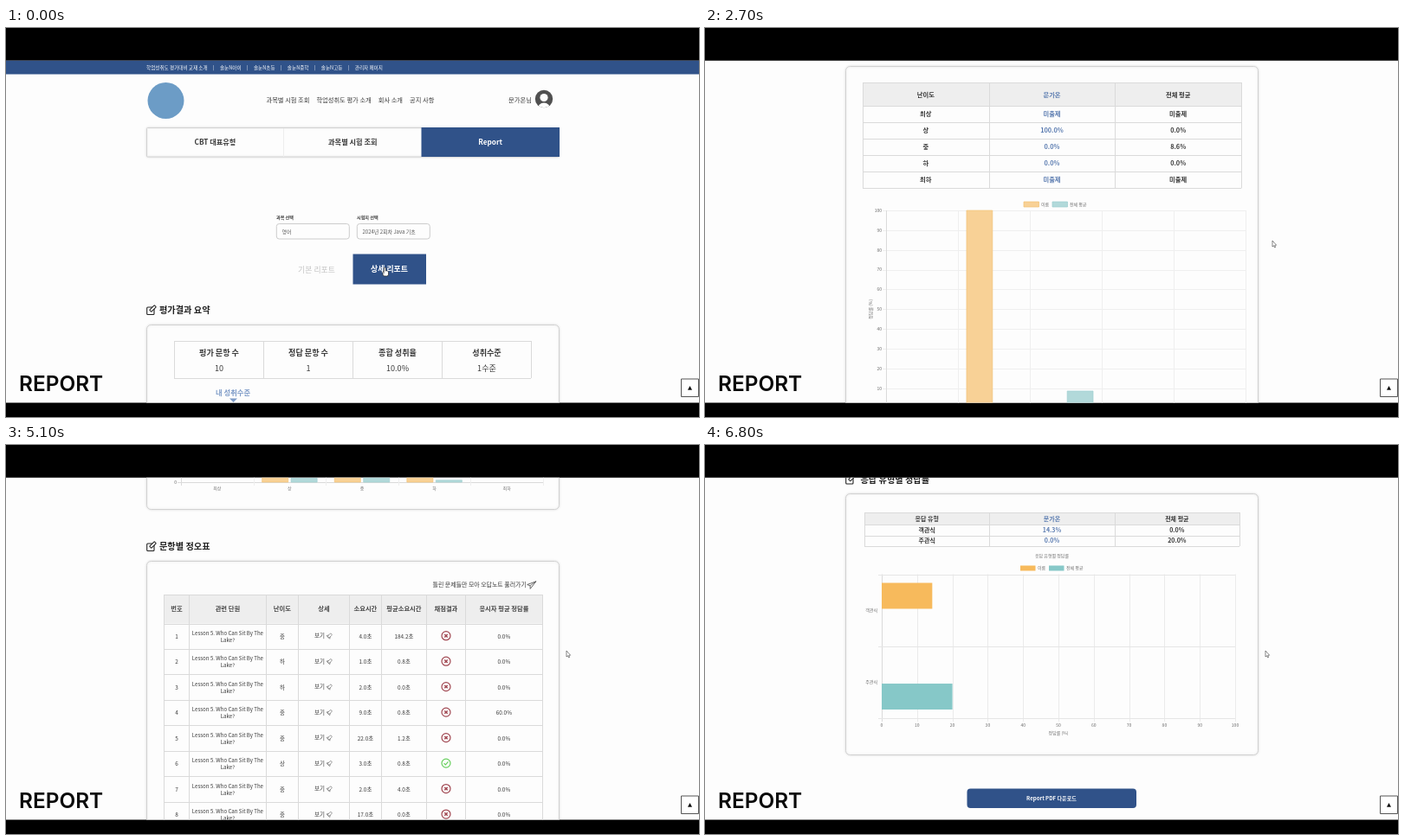
Recreate the animation shown at these times as an HTML page with a canvas. Size 800 by 450 pixels, loop 6900 ms.

```html
<!DOCTYPE html>
<html lang="ko">
<head>
<meta charset="utf-8">
<title>Report</title>
<style>
html, body { margin: 0; width: 100%; height: 100%; overflow: hidden; background: #000; }
canvas { display: block; width: 800px; height: 450px; }
</style>
</head>
<body>
<canvas id="stage"></canvas>
<script>
const canvas = document.getElementById('stage');
const dpr = window.devicePixelRatio || 1;
canvas.width = 800 * dpr;
canvas.height = 450 * dpr;
const c = canvas.getContext('2d');

const LOOP = 6900, STEP = 100;
const SANS = '"Noto Sans CJK KR", "Noto Sans CJK", "Noto Sans", sans-serif';
const PAGE = '#fdfdfd', BLUE = '#305289', INK = '#383838', LINE = '#dadada', NAME_INK = '#5a7bb0';
const ORANGE = '#f7ba5c', TEAL = '#86c8c8';
const SOFT = ['#f8d196', '#b2d9da'], EDGES = ['#f1c070', '#9bcdce'];
const USER = '문가온', NONE = '미출제';
const LEVELS = ['최상', '상', '중', '하', '최하'];

// 0 to 1 between two times, eased at both ends
function ease(t, from, to) {
  const p = Math.min(1, Math.max(0, (t - from) / (to - from)));
  return p * p * (3 - 2 * p);
}

function scrollAt(t) {
  return 337 * ease(t, 100, 700) + 159 * ease(t, 2200, 2700) + 351 * ease(t, 2900, 3500)
    + 213 * ease(t, 3600, 4200) + 223 * ease(t, 4400, 5000)
    + 313 * ease(t, 5200, 5900) + 211 * ease(t, 6100, 6700);
}

function pointerAt(t) {
  const out = ease(t, 100, 600), up = ease(t, 2100, 2600), back = ease(t, 4300, 4800);
  return [435 + 194 * out + 26 * up - 8 * back, 277 - 11 * out - 20 * up - 8 * back];
}

// n equal parts from a to b
const span = (a, b, n) => Array.from({ length: n + 1 }, (_, i) => a + (b - a) * i / n);
const sums = (a, sizes) => sizes.reduce((out, s) => [...out, out[out.length - 1] + s], [a]);

function text(s, x, y, size, o = {}) {
  c.font = `${o.w || 400} ${size}px ${o.font || SANS}`;
  c.textAlign = o.align || 'center';
  c.fillStyle = o.col || INK;
  c.fillText(s, x, y + size * 0.36);
}
const left = (s, x, y, size, o) => text(s, x, y, size, { ...o, align: 'left' });
const bold = (s, x, y, size, col) => text(s, x, y, size, { w: 700, col });
const tiny = (s, x, y, align) => text(s, x, y, 5, { align, col: '#707070' });

// Items one after another
function run(items, x, y, size, gap, o) {
  items.forEach(s => {
    left(s, x, y, size, o);
    x += c.measureText(s).width + gap;
  });
}

function rect(x, y, w, h, col) {
  c.fillStyle = col;
  c.fillRect(x, y, w, h);
}
const hLine = (x, y, w, col = LINE) => rect(x, Math.round(y), w, 1, col);
const vLine = (x, y, h, col = LINE) => rect(Math.round(x), y, 1, h, col);

function box(x, y, w, h, r, fill, stroke, lw = 1) {
  c.beginPath();
  c.roundRect(x, y, w, h, r);
  if (fill) { c.fillStyle = fill; c.fill(); }
  if (stroke) { c.strokeStyle = stroke; c.lineWidth = lw; c.stroke(); }
}

function disc(x, y, r, fill, stroke, lw) {
  c.beginPath();
  c.arc(x, y, r, 0, 7);
  if (fill) { c.fillStyle = fill; c.fill(); }
  if (stroke) { c.strokeStyle = stroke; c.lineWidth = lw; c.stroke(); }
}

// Polyline from flat coordinates
function path(p, stroke, lw, fill) {
  c.beginPath();
  for (let i = 0; i < p.length; i += 2) c.lineTo(p[i], p[i + 1]);
  if (fill) { c.closePath(); c.fillStyle = fill; c.fill(); }
  if (stroke) { c.strokeStyle = stroke; c.lineWidth = lw; c.stroke(); }
}

function moved(x, y, draw, turn = 0) {
  c.save();
  c.translate(x, y);
  c.rotate(turn);
  draw();
  c.restore();
}

function clipped(x, y, w, h, r, draw) {
  c.save();
  c.beginPath();
  c.roundRect(x, y, w, h, r);
  c.clip();
  draw();
  c.restore();
}

function card(y, bottom, r = 5) {
  c.save();
  c.shadowColor = 'rgba(0,0,0,.12)';
  c.shadowBlur = 3 * dpr;
  box(162.5, y + .5, 476, bottom - y - 1, r, PAGE, '#d2d2d2');
  c.restore();
}

function heading(s, y, x = 177) {
  box(162.7, y - 3.5, 8.3, 8.5, 1, null, '#222', 1.1);
  moved(169.5, y - 2, () => box(-4, -1.5, 8, 3, .6, PAGE, '#222', 1), -Math.PI / 4);
  left(s, x, y, 10.2, { w: 700, col: '#222' });
}

function grid(xs, ys, headed) {
  const x0 = xs[0], y0 = ys[0], w = xs[xs.length - 1] - x0, h = ys[ys.length - 1] - y0;
  if (headed) rect(x0, y0, w, ys[1] - y0, '#eeeeee');
  ys.forEach(y => hLine(x0, y, w));
  xs.forEach(x => vLine(x, y0, h));
}

function compare(rows, xs, y, head, pitch, size) {
  grid(xs, [y, ...rows.map((_, i) => y + head + pitch * i)], true);
  rows.forEach((row, i) => row.forEach((s, k) => bold(s, (xs[k] + xs[k + 1]) / 2,
    i ? y + head + pitch * (i - .5) : y + head / 2 + .3, size, k === 1 ? NAME_INK : INK)));
}

function byLevel(mean, unit, pairs) {
  const cell = v => v === undefined ? NONE : v.toFixed(1) + unit;
  return [['난이도', USER, mean], ...LEVELS.map((s, i) => [s, cell(pairs[i][0]), cell(pairs[i][1])])];
}

function legend(x, y, second, fills, edges) {
  ['이름', second].forEach((s, i) => {
    box(x + 33 * i, y - 3, 17.5, 6, 0, fills[i], edges && edges[i], .7);
    tiny(s, x + 33 * i + 20, y, 'left');
  });
}

function columns(x, y, w, h, max, step, pairs, title) {
  const cat = w / 5, bar = cat * .36;
  for (let v = 0; v <= max; v += step) {
    const gy = y + h - h * v / max;
    hLine(x - 4, gy, w + 4, v ? '#efefef' : '#dadada');
    tiny(v, x - 5, gy, 'right');
  }
  span(x, x + w, 5).forEach((gx, i) => vLine(gx, y, h + 4, i ? '#efefef' : '#dadada'));
  pairs.forEach((pair, i) => {
    pair.forEach((v, k) => {
      const bh = h * v / max, bx = x + cat * (i + .12 + .4 * k);
      if (bh) box(bx, y + h - bh, bar, bh, 0, SOFT[k], EDGES[k], .6);
    });
    tiny(LEVELS[i], x + cat * (i + .5), y + h + 7.5);
  });
  moved(x - 17.5, y + h / 2, () => tiny(title, 0, 0), -Math.PI / 2);
}

function header() {
  rect(0, 37, 800, 16.5, BLUE);
  const schools = ['아이', '초등', '중학', '고등'].flatMap(s => ['|', '솔눈N' + s]);
  run(['학업성취도 평가대비 교재 소개', ...schools, '|', '관리자 페이지'], 162, 45.5, 5.6, 6.4, { col: '#fff', w: 500 });

  disc(184.5, 84, 21, '#6c9cc6');
  run(['과목별 시험 조회', '학업성취도 평가 소개', '회사 소개', '공지 사항'], 300.5, 83.5, 7.25, 8, { w: 500 });
  left(USER + '님', 580, 83.8, 7.3);
  clipped(610.8, 71.8, 20.4, 20.4, 10.2, () => {
    rect(610, 71, 22, 22, '#505050');
    disc(621, 80.5, 4.6, PAGE);
    disc(621, 94, 7.5, PAGE);
  });

  card(115, 149.5, 1);
  vLine(320, 116, 33, '#eee');
  rect(479.5, 115, 159.5, 34, BLUE);
  ['CBT 대표유형', '과목별 시험 조회', 'Report']
    .forEach((s, i) => bold(s, 241.5 + 158.8 * i, 132, 8.2, i === 2 ? '#fff' : INK));

  [['과목 선택', '영어'], ['시험지 선택', '2024년 2회차 Java 기초']].forEach(([label, value], i) => {
    const x = 312 + 93 * i;
    left(label, x, 219.5, 5.1, { w: 700 });
    box(x + .3, 226.5, 84, 17.5, 3, PAGE, '#ccc');
    left(value, x + 6.5, 235.5, 6, { col: '#555' });
  });
  text('기본 리포트', 358.5, 280, 8.9, { w: 500, col: '#c4c4c4' });
  rect(400.5, 261.5, 84.5, 35, BLUE);
  bold('상세 리포트', 442.5, 279, 8.9, '#fff');
}

function summary() {
  heading('평가결과 요약', 326.5);
  card(343, 488);
  grid(span(194, 606, 4), [362, 405]);
  [['평가 문항 수', '10'], ['정답 문항 수', '1'], ['종합 성취율', '10.0%'], ['성취수준', '1수준']].forEach(([a, b], i) => {
    bold(a, 246 + 103 * i, 375.5, 9.1);
    text(b, 246 + 103 * i, 393.5, 9.1);
  });
  bold('내 성취수준', 262, 422, 8.3, '#7f9cc8');
  path([258, 428.5, 267, 428.5, 262.5, 433], null, 0, '#7f9cc8');

  const edges = sums(194, [78, 132, 119, 83]);
  const shades = ['#f1f1f1', '#dadada', '#cecece', '#bdbdbd'];
  clipped(194, 435, 412, 21, 10.5, () => shades.forEach((col, i) => rect(edges[i], 435, 412, 21, col)));
  ['기초학력 미달', '기초학력', '보통학력', '우수학력'].forEach((s, i) => {
    const x = (edges[i] + edges[i + 1]) / 2;
    text(i + 1 + '수준', x, 446, 7.5);
    rect(x - 9, 450, 18, .7, INK);
    bold(s, x, 463, 6.4);
  });
}

function difficulty() {
  const xs = span(182, 619, 3);
  const rates = [[], [100, 0], [0, 8.6], [0, 0], []];
  heading('문항 난이도별 성취율', 522.5);
  card(540, 967);
  compare(byLevel('전체 평균', '%', rates), xs, 559, 27.3, 19, 7.3);
  legend(368, 700, '전체 평균', SOFT, EDGES);
  columns(209, 707, 415, 228.6, 100, 10, rates, '정답률 (%)');

  const times = [[], [3, .8], [8.6, 27.2], [1.5, .4], []];
  heading('문항 난이도별 문제 풀이 소요 시간', 1010);
  card(1026, 1358);
  compare(byLevel('전체평균', '초', times), xs, 1045.5, 14.5, 12.65, 7);
  legend(364.5, 1142, '전체평균', SOFT, EDGES);
  columns(202, 1149, 418, 177, 30, 5, times, '시간 (초)');
}

function mark(x, y, ok) {
  const col = ok ? '#66cf5c' : '#a04650';
  disc(x, y, 5, null, col, 1.2);
  if (ok) path([x - 2.4, y, x - .6, y + 1.8, x + 2.5, y - 1.7], col, 1.1);
  else [-1.7, 1.7].forEach(d => path([x - 1.7, y - d, x + 1.7, y + d], col, 1.4));
}

function rocket(x, y) {
  moved(x, y, () => {
    box(-1.3, -3.2, 2.6, 5.5, 1.3, null, '#666', .6);
    path([-1.3, 0, -2.6, 2.3, 2.6, 2.3, 1.3, 0], '#666', .6);
  }, Math.PI / 4);
}

function answers() {
  heading('문항별 정오표', 1400.5);
  card(1417, 1804);
  left('틀린 문제들만 모아 오답노트 풀러가기', 492.5, 1444.7, 6.95);
  moved(607.5, 1444, () => {
    path([-5, -3, 5.5, 0, -5, 3, -3, 0, -5, -3], '#555', .8);
    path([-3, 0, 5.5, 0], '#555', .7);
  }, -Math.PI / 5);

  const xs = sums(182, [29, 89, 37, 59, 37, 52, 45, 89]);
  const mid = k => (xs[k] + xs[k + 1]) / 2 + .4;
  grid(xs, [1456, ...span(1489.5, 1784.3, 10)], true);
  ['번호', '관련 단원', '난이도', '상세', '소요시간', '평균소요시간', '채점결과', '응시자 평균 정답률']
    .forEach((s, k) => bold(s, mid(k), 1472.5, 7.3, '#484848'));
  const own = [4, 1, 2, 9, 22, 3, 2, 17, 2, 4];
  const mean = [184.2, .8, 0, .8, 1.2, .8, 4, 0, 0, 0];
  [...'중하하중중상중중중중'].forEach((level, i) => {
    const y = 1504.5 + 29.48 * i;
    const cell = (s, k) => text(s, mid(k), y, 6.4);
    cell(i + 1, 0);
    text('Lesson 5. Who Can Sit By The', mid(1), y - 4, 6.1);
    text('Lake?', mid(1), y + 4.3, 6.1);
    cell(level, 2);
    left('보기', 356, y - .7, 6.5);
    rocket(373.5, y - .7);
    cell(own[i].toFixed(1) + '초', 4);
    cell(mean[i].toFixed(1) + '초', 5);
    mark(508, y - .8, level === '상');
    cell(i === 3 ? '60.0%' : '0.0%', 7);
  });
}

function types() {
  heading('응답 유형별 정답률', 1847, 179.5);
  card(1863, 2166);
  compare([['응답 유형', USER, '전체 평균'], ['객관식', '14.3%', '0.0%'], ['주관식', '0.0%', '20.0%']],
    span(184, 617, 3), 1885, 14, 12.5, 7);
  tiny('응답 유형별 정답률', 400.5, 1935);
  legend(364, 1949.5, '전체 평균', [ORANGE, TEAL]);

  const x = 204, y = 1956.5, w = 408, h = 166.5;
  span(x, x + w, 10).forEach((gx, i) => {
    vLine(gx, y, h + 4, i ? '#ebebeb' : '#dadada');
    tiny(i * 10, gx, y + h + 8);
  });
  span(y, y + h, 2).forEach(gy => hLine(x - 4, gy, w + 4, '#e6e6e6'));
  rect(x, y + h * .06, w * .143, h * .18, ORANGE);
  rect(x, y + h * .76, w * .2, h * .18, TEAL);
  ['객관식', '주관식'].forEach((s, i) => tiny(s, 199, y + h * (.25 + .5 * i), 'right'));
  tiny('정답률 (%)', x + w / 2, 2140);
  box(302.5, 2204.5, 195.5, 22.5, 4, BLUE);
  bold('Report PDF 다운로드', 400, 2216, 6.1, '#fff');
}

function pointer(x, y) {
  moved(x, y, () => {
    if (x < 485) {
      box(0, 4, 6.5, 6, 2, '#fff', '#222', .7);
      box(1.4, 0, 2, 7, 1, '#fff', '#222', .7);
      rect(1.7, 4.4, 4, 4, '#fff');
    } else {
      path([0, 0, 0, 7, 1.6, 5.8, 2.7, 8, 3.6, 7.6, 2.7, 5.4, 4.6, 5.2, 0, 0], '#555', .7, '#fff');
    }
  });
}

function draw(t) {
  c.setTransform(dpr, 0, 0, dpr, 0, 0);
  rect(0, 0, 800, 450, '#000');
  clipped(0, 37.8, 800, 395.8, 0, () => {
    rect(0, 37, 800, 398, PAGE);
    moved(0, -Math.round(scrollAt(t)), () => {
      header();
      summary();
      difficulty();
      answers();
      types();
    });
    box(779.5, 406, 20, 20.5, 0, '#fff', '#555');
    path([787, 418.7, 792, 418.7, 789.5, 414], null, 0, '#111');
    pointer(...pointerAt(t));
    left('REPORT', 15, 411.3, 24.4, { w: 600, col: '#0a0a0a', font: 'Inter, sans-serif' });
  });
}

const start = performance.now();
function tick() {
  const t = (performance.now() - start) % LOOP;
  draw(Math.floor(t / STEP) * STEP);
  requestAnimationFrame(tick);
}
tick();
</script>
</body>
</html>
```
